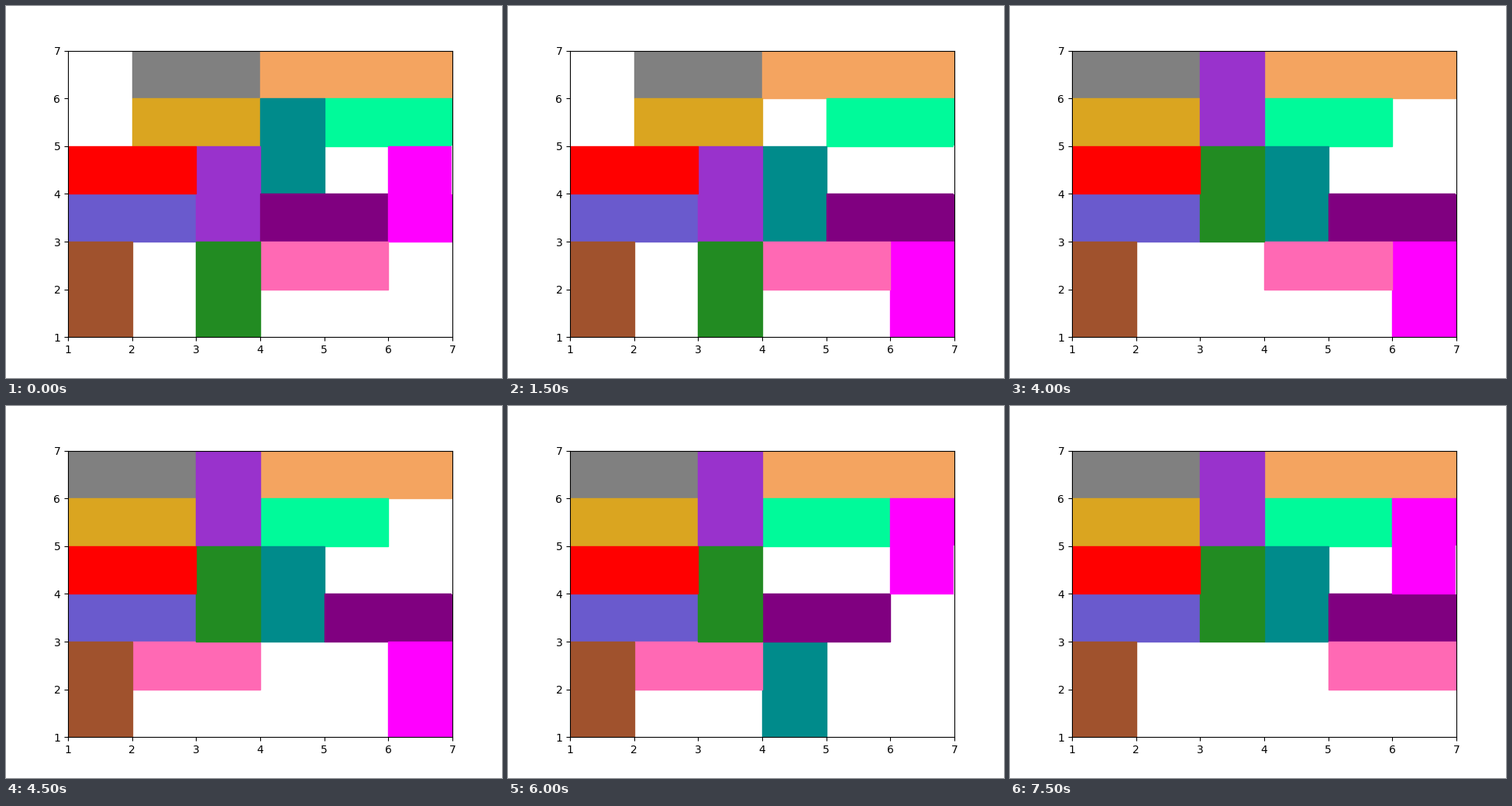
These frames come from a looping animation (640 by 480 pixels, 8 s). A matplotlib script:

```python
import matplotlib.pyplot as plt
from matplotlib.animation import FuncAnimation
from matplotlib.patches import Rectangle

# Blocks from bottom to top of the stack: x, y, width, height
BLOCKS = {
    "gray": (2, 6, 2, 1),
    "sandybrown": (4, 6, 3, 1),
    "goldenrod": (2, 5, 2, 1),
    "mediumspringgreen": (5, 5, 2, 1),
    "darkcyan": (4, 4, 1, 2),
    "slateblue": (1, 3, 2, 1),
    "darkorchid": (3, 3, 1, 2),
    "purple": (4, 3, 2, 1),
    "magenta": (6, 3, 1, 2),
    "hotpink": (4, 2, 2, 1),
    "sienna": (1, 1, 1, 2),
    "forestgreen": (3, 1, 1, 2),
    "red": (1, 4, 2, 1),
}

# One slide per step; each block moves only along its long side
MOVES = [
    ("magenta", -2),
    ("purple", 1),
    ("darkcyan", -1),
    ("mediumspringgreen", -1),
    ("gray", -1),
    ("goldenrod", -1),
    ("darkorchid", 2),
    ("forestgreen", 2),
    ("hotpink", -2),
    ("darkcyan", -2),
    ("purple", -1),
    ("magenta", 3),
    ("purple", 1),
    ("darkcyan", 2),
    ("hotpink", 3),
]

fig, ax = plt.subplots(figsize=(6.4, 4.8), dpi=100)
ax.set_xlim(1, 7)
ax.set_ylim(1, 7)

cars = {
    color: ax.add_patch(Rectangle((x, y), w, h, color=color))
    for color, (x, y, w, h) in BLOCKS.items()
}
ax.plot([7, 7], [4, 5], color="white")  # exit


def update(step):
    pos = {color: [x, y] for color, (x, y, _, _) in BLOCKS.items()}
    for color, shift in MOVES[:step]:
        _, _, w, h = BLOCKS[color]
        pos[color][0 if w > h else 1] += shift
    for color, car in cars.items():
        car.set_xy(pos[color])
    return list(cars.values())


anim = FuncAnimation(fig, update, frames=len(MOVES) + 1, interval=500,
                     repeat=True, repeat_delay=0)
plt.show()
```
